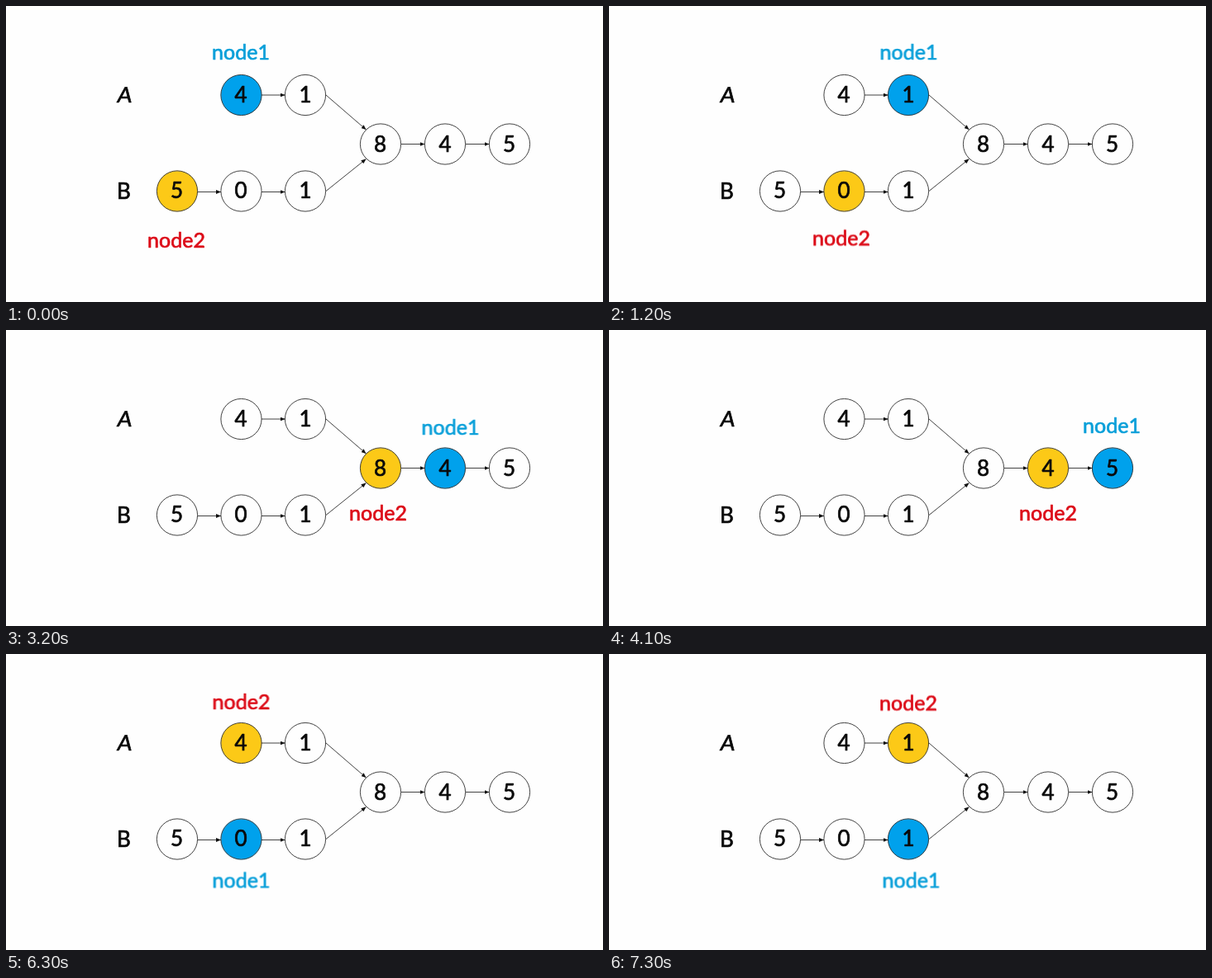
An HTML page that plays this animation: 722 by 359 pixels, repeating every 8 s.

```html
<!DOCTYPE html>
<html lang="en">
<head>
<meta charset="utf-8">
<title>Linked list intersection</title>
<style>
  html, body { margin: 0; width: 100%; height: 100%; overflow: hidden; background: #fefefe; }
  svg { display: block; width: 722px; height: 359px; }
  text {
    font: 26px Lato, "Open Sans", sans-serif;
    text-anchor: middle;
    stroke-width: .7;
    stroke-linejoin: round;
  }
  .ink { fill: #0a0a0a; stroke: #0a0a0a; }
  .rings, .links { fill: none; stroke: #222; stroke-width: .85; }
  .links path { marker-end: url(#tip); }
  .label { font-size: 25px; }
  .one.disc { fill: #00a1ec; }
  .two.disc { fill: #fcc917; }
  .one.label { fill: #089fd9; stroke: #089fd9; }
  .two.label { fill: #dc0c18; stroke: #dc0c18; }

  /* Both pointers jump from node to node */
  .disc, .label { animation: 8s step-end infinite; }
  .one.disc { animation-name: disc1; }
  .two.disc { animation-name: disc2; }
  .one.label { animation-name: label1; }
  .two.label { animation-name: label2; }

  @keyframes disc1 {
    0% { transform: translate(284.5px, 108px); }
    15% { transform: translate(362px, 108px); }
    27.5% { transform: translate(453px, 167.5px); }
    40% { transform: translate(531px, 167.5px); }
    51.25% { transform: translate(609px, 167.5px); }
    62.5% { transform: translate(207px, 224.5px); }
    78.75% { transform: translate(284.5px, 224.5px); }
    91.25%, 100% { transform: translate(362px, 224.5px); }
  }
  @keyframes disc2 {
    0% { transform: translate(207px, 224.5px); }
    15% { transform: translate(284.5px, 224.5px); }
    27.5% { transform: translate(362px, 224.5px); }
    40% { transform: translate(453px, 167.5px); }
    51.25% { transform: translate(531px, 167.5px); }
    62.5% { transform: translate(609px, 167.5px); }
    78.75% { transform: translate(284.5px, 108px); }
    91.25%, 100% { transform: translate(362px, 108px); }
  }
  @keyframes label1 {
    0% { transform: translate(284px, 64.5px); }
    15% { transform: translate(362.5px, 64.5px); }
    27.5% { transform: translate(456px, 126.5px); }
    40% { transform: translate(537.5px, 126.5px); }
    51.25% { transform: translate(608px, 124.5px); }
    62.5% { transform: translate(208px, 287.5px); }
    78.75% { transform: translate(284.5px, 283px); }
    91.25%, 100% { transform: translate(365.5px, 283px); }
  }
  @keyframes label2 {
    0% { transform: translate(206px, 292.5px); }
    15% { transform: translate(281px, 290px); }
    27.5% { transform: translate(362px, 290px); }
    40% { transform: translate(450px, 230.5px); }
    51.25% { transform: translate(531px, 230.5px); }
    62.5% { transform: translate(610px, 230.5px); }
    78.75% { transform: translate(284.5px, 66.5px); }
    91.25%, 100% { transform: translate(362px, 68px); }
  }
</style>
</head>
<body>
<svg viewBox="0 0 722 359">
  <defs>
    <marker id="tip" viewBox="0 0 6 5" refX="6" refY="2.5" markerWidth="6" markerHeight="5"
            markerUnits="userSpaceOnUse" orient="auto">
      <path d="M0 0L6 2.5L0 5Z" fill="#111" stroke="none"/>
    </marker>
  </defs>

  <circle class="one disc" r="24.6"/>
  <circle class="two disc" r="24.6"/>

  <g class="rings">
    <circle cx="284.5" cy="108" r="24.6"/>
    <circle cx="362" cy="108" r="24.6"/>
    <circle cx="207" cy="224.5" r="24.6"/>
    <circle cx="284.5" cy="224.5" r="24.6"/>
    <circle cx="362" cy="224.5" r="24.6"/>
    <circle cx="453" cy="167.5" r="24.6"/>
    <circle cx="531" cy="167.5" r="24.6"/>
    <circle cx="609" cy="167.5" r="24.6"/>
  </g>

  <g class="links">
    <path d="M309 108H337.5"/>
    <path d="M387 108L435.5 150"/>
    <path d="M232 225.5H260"/>
    <path d="M309 225.5H337.5"/>
    <path d="M387 224.5L435.5 185.5"/>
    <path d="M478 167.5H506.5"/>
    <path d="M556 167.5H584.5"/>
  </g>

  <g class="ink">
    <text transform="translate(142.5 117) skewX(-8)">A</text>
    <text x="142.5" y="234">B</text>
    <text x="284" y="117">4</text>
    <text x="362" y="117">1</text>
    <text x="206.5" y="233">5</text>
    <text x="284" y="233">0</text>
    <text x="362" y="233">1</text>
    <text x="452.5" y="176.5">8</text>
    <text x="531" y="176.5">4</text>
    <text x="608.5" y="176.5">5</text>
  </g>

  <text class="one label">node1</text>
  <text class="two label">node2</text>
</svg>
</body>
</html>
```
